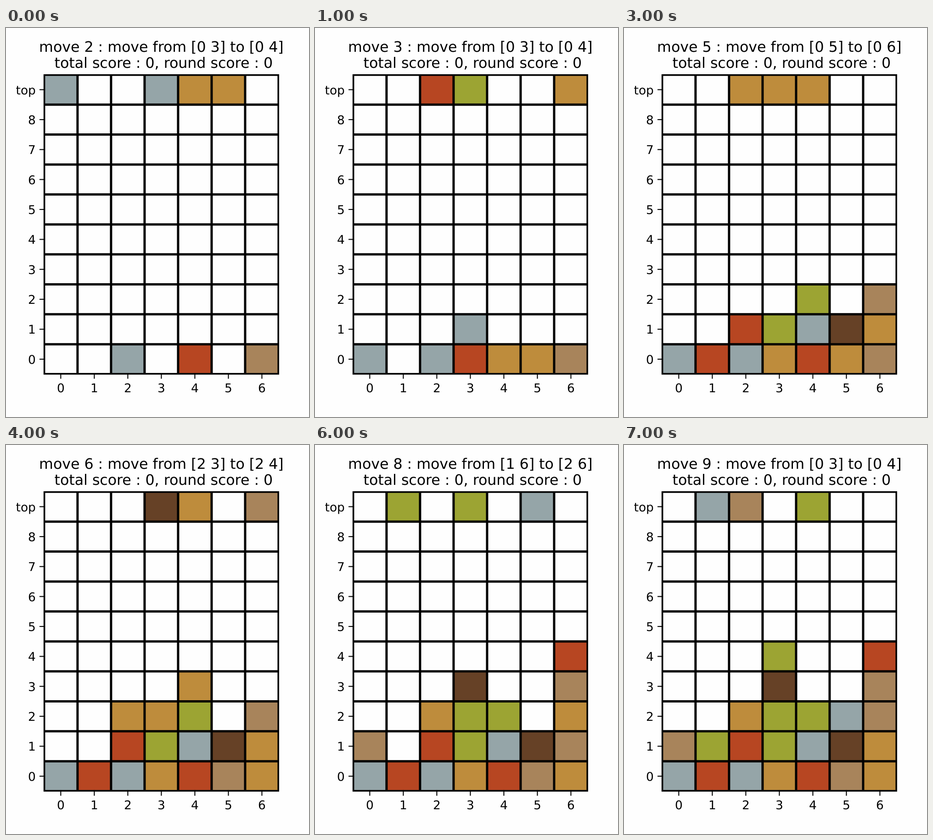
These frames come from a looping animation (660 by 849 pixels, 8000 ms). An HTML page:

```html
<!DOCTYPE html>
<html lang="en">
<head>
<meta charset="utf-8">
<title>Falling blocks</title>
<style>
  html, body { margin: 0; width: 100%; height: 100%; overflow: hidden; background: #fefefe; }
  svg { display: block; width: 660px; height: 849px; }
  text { font-family: "DejaVu Sans", sans-serif; font-size: 26.3px; text-rendering: geometricPrecision; }
  .title { font-size: 31.6px; text-anchor: middle; }
</style>
</head>
<body>
<svg id="stage" viewBox="0 0 660 849"></svg>
<script>
const COLS = 7, ROWS = 10, STEP = 1000;
const LEFT = 82.8, TOP = 101.9, W = 73.02, H = 65.36;
const RIGHT = LEFT + COLS * W, BOTTOM = TOP + ROWS * H, MID = 338.4;
const COLORS = { s: '#95a5a8', o: '#be8c3c', r: '#b74622', t: '#a8845b', g: '#9ca433', b: '#664126' };

// Swapped cells, next tiles on the top row, stacks listed from the bottom up.
const MOVES = [
  ['[0 3] to [0 4]', 's--soo-', '- - s - r - t'],
  ['[0 3] to [0 4]', '--rg--o', 's - s rs o o t'],
  ['[1 3] to [1 4]', '-r--gbt', 's - sr osg r o to'],
  ['[0 5] to [0 6]', '--ooo--', 's r sr og rsg ob tot'],
  ['[2 3] to [2 4]', '---bo-t', 's r sro ogo rsgo tb oot'],
  ['[1 6] to [2 6]', 't---g-r', 's r sro oggb rs tb oott'],
  ['[1 6] to [2 6]', '-g-g-s-', 'st r sro oggb rsg tb ototr'],
  ['[0 3] to [0 4]', '-st-g--', 'st rg sro oggbg rsg tbs oottr']
];

const stage = document.getElementById('stage');

function add(tag, attrs, text = '') {
  const el = document.createElementNS('http://www.w3.org/2000/svg', tag);
  for (const key in attrs) el.setAttribute(key, attrs[key]);
  el.textContent = text;
  return stage.appendChild(el);
}

const line = (x1, y1, x2, y2, width) =>
  add('line', { x1, y1, x2, y2, stroke: '#000', 'stroke-width': width });

const cells = [];
for (let col = 0; col < COLS; col++) {
  cells.push([]);
  for (let row = 0; row < ROWS; row++) {
    cells[col].push(add('rect', {
      x: LEFT + col * W, y: BOTTOM - (row + 1) * H, width: W, height: H, fill: 'none'
    }));
  }
}

for (let i = 1; i < COLS; i++) line(LEFT + i * W, TOP, LEFT + i * W, BOTTOM, 5);
for (let i = 1; i < ROWS; i++) line(LEFT, TOP + i * H, RIGHT, TOP + i * H, 5);
add('rect', {
  x: LEFT + 0.8, y: TOP + 0.8, width: RIGHT - LEFT - 1.6, height: BOTTOM - TOP - 1.6,
  fill: 'none', stroke: '#000', 'stroke-width': 3.6
});

for (let col = 0; col < COLS; col++) {
  const x = LEFT + (col + 0.5) * W;
  line(x, BOTTOM, x, BOTTOM + 10, 2.1);
  add('text', { x, y: 795, 'text-anchor': 'middle' }, col);
}
for (let row = 0; row < ROWS; row++) {
  const y = BOTTOM - (row + 0.5) * H;
  line(LEFT - 9.8, y, LEFT, y, 2.1);
  add('text', { x: 64.7, y: y + 10, 'text-anchor': 'end' }, row === ROWS - 1 ? 'top' : row);
}

const title = add('text', { class: 'title', x: MID, y: 51.5 });
add('text', { class: 'title', x: MID + 5, y: 86.7 }, 'total score : 0, round score : 0');

let shown = -1;
function show(index) {
  if (index === shown) return;
  shown = index;
  const [swap, top, stacks] = MOVES[index];
  title.textContent = `move ${index + 2} : move from ${swap}`;
  stacks.split(' ').forEach((stack, col) => {
    cells[col].forEach((cell, row) => {
      const tile = row === ROWS - 1 ? top[col] : stack[row];
      cell.setAttribute('fill', COLORS[tile] || 'none');
    });
  });
}

const start = performance.now();
function tick() {
  show(Math.floor((performance.now() - start) / STEP) % MOVES.length);
  requestAnimationFrame(tick);
}
tick();
</script>
</body>
</html>
```
